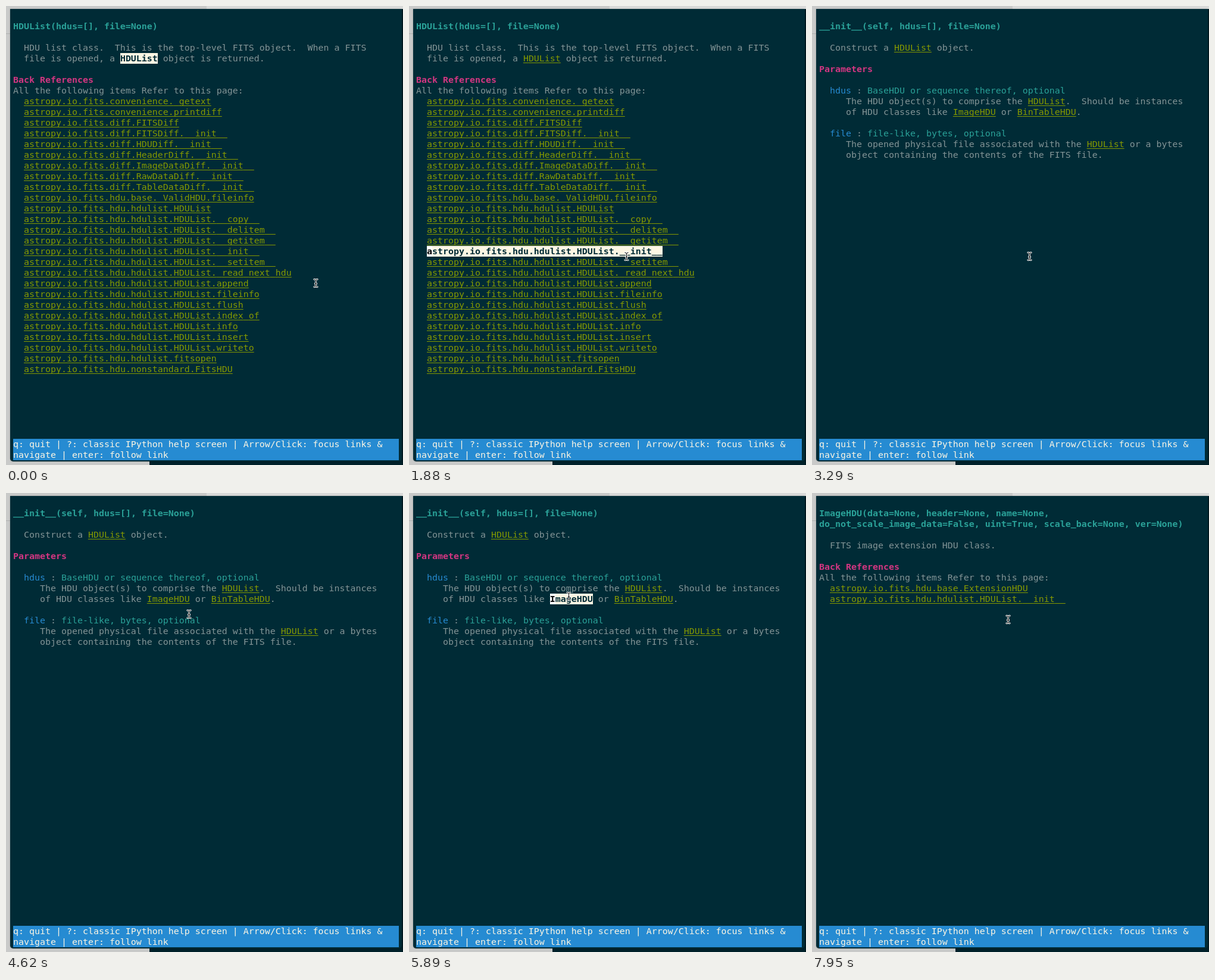
Animation of 667 by 771 pixels, one loop 8 s. Source, as an HTML page:

```html
<!DOCTYPE html>
<html lang="en">
<head>
<meta charset="utf-8">
<title>Terminal help browser</title>
<style>
  html, body { margin: 0; width: 100%; height: 100%; overflow: hidden; }
  body { position: relative; background: #c9cac9; }
  body > * { position: absolute; }
  .top { left: 337px; top: 0; right: 0; height: 6px; background: #d9dad9; }
  .edge { left: 0; top: 46px; width: 7px; height: 1px; background: #b0b1b0; }
  .below { left: 241px; top: 760px; right: 0; bottom: 0; background: #00212a; }
  .side { left: 665px; top: 5px; width: 2px; bottom: 0; background: #001a21; }
  .window {
    left: 7px; top: 5px; width: 658px; height: 760px;
    background: #002b36; border-radius: 0 0 5px 5px;
    box-shadow: 0 0 2px rgba(0, 0, 0, .4);
  }
  pre {
    left: 12px; top: 25px; margin: 0; color: #839496;
    font: 14.95px/18px "DejaVu Sans Mono", monospace;
    font-variant-ligatures: none;
  }
  .bar { top: 727px; width: 648px; height: 36px; background: #268bd2; color: #fdf6e3; }
  h1, h2 { display: inline; font-size: inherit; margin: 0; }
  h1, em { color: #2aa198; }
  h2 { color: #d33682; }
  em, i { font-style: normal; }
  i { color: #268bd2; }
  a {
    display: inline-block; height: 18px; vertical-align: top; color: #859900;
    text-decoration: underline 1px; text-underline-offset: 2px;
    text-decoration-skip-ink: none;
  }
  a.on { background: #fdf6e3; color: #002b36; font-weight: bold; text-decoration: none; }
  s { text-decoration: none; }
  a.on.lit s { display: inline-block; background: #fff; color: #000; }
  u { position: relative; top: -1px; text-decoration: none; }
  svg { left: -8px; top: -10px; width: 16px; height: 20px; }
</style>
</head>
<body>
<div class="top"></div>
<div class="edge"></div>
<div class="below"></div>
<div class="side"></div>
<div class="window"></div>
<pre class="bar">q: quit | ?: classic IPython help screen | Arrow/Click: focus links &amp;
navigate | enter: follow link</pre>
<svg id="mouse" viewBox="-8 -10 16 20" fill="none" stroke-linecap="round">
  <g id="beam">
    <path id="shape" stroke="#fff" stroke-width="2.8"
      d="M-2.7-6.3Q0-6.3 0-4Q0-6.3 2.7-6.3M0-4V4M-2.7 6.3Q0 6.3 0 4Q0 6.3 2.7 6.3M-1.3 1H1.3"/>
    <path stroke="#000" stroke-width="1"
      d="M-2.7-6.3Q0-6.3 0-4Q0-6.3 2.7-6.3M0-4V4M-2.7 6.3Q0 6.3 0 4Q0 6.3 2.7 6.3M-1.3 1H1.3"/>
  </g>
</svg>
<script>
const LOOP = 8000;

// Underscores sit a little higher than the font draws them.
const raise = text => text.replace(/_+/g, '<u>$&</u>');
const link = (text, id = '') =>
  `<a${id && ` id="${id}"`}><s>${text[0]}</s>${raise(text.slice(1))}</a>`;
const head = text => `<h1>${raise(text)}</h1>`;
const list = (prefix, names) => names.split(' ').map(n =>
  '  ' + link(prefix + n, n === 'hdulist.HDUList.__init__' ? 'init' : '')).join('\n');
const refs = '<h2>Back References</h2>\nAll the following items Refer to this page:\n';

const methods = ('__copy__ __delitem__ __getitem__ __init__ __setitem__ _read_next_hdu ' +
  'append fileinfo flush index_of info insert writeto')
  .replace(/\S+/g, 'hdulist.HDUList.$&');

const pages = [
`${head('HDUList(hdus=[], file=None)')}

  HDU list class.  This is the top-level FITS object.  When a FITS
  file is opened, a ${link('HDUList', 'cls')} object is returned.

${refs}${list('astropy.io.fits.', 'convenience._getext convenience.printdiff diff.FITSDiff ' +
  'diff.FITSDiff.__init__ diff.HDUDiff.__init__ diff.HeaderDiff.__init__ ' +
  'diff.ImageDataDiff.__init__ diff.RawDataDiff.__init__ diff.TableDataDiff.__init__')}
${list('astropy.io.fits.hdu.', 'base._ValidHDU.fileinfo hdulist.HDUList ' + methods +
  ' hdulist.fitsopen nonstandard.FitsHDU')}`,

`${head('__init__(self, hdus=[], file=None)')}

  Construct a ${link('HDUList')} object.

<h2>Parameters</h2>

  <i>hdus</i> : <em>BaseHDU or sequence thereof, optional</em>
     The HDU object(s) to comprise the ${link('HDUList', 'arg')}.  Should be instances
     of HDU classes like ${link('ImageHDU', 'image')} or ${link('BinTableHDU')}.

  <i>file</i> : <em>file-like, bytes, optional</em>
     The opened physical file associated with the ${link('HDUList')} or a bytes
     object containing the contents of the FITS file.`,

`${head('ImageHDU(data=None, header=None, name=None,\ndo_not_scale_image_data=False, uint=True, scale_back=None, ver=None)')}

  FITS image extension HDU class.

${refs}  ${link('astropy.io.fits.hdu.base.ExtensionHDU')}
  ${link('astropy.io.fits.hdu.hdulist.HDUList.__init__')}`
].map(html => {
  const pre = document.createElement('pre');
  pre.innerHTML = html;
  document.body.insertBefore(pre, mouse);
  return pre;
});

// [start, page, focused link]
const scenes = [
  [0, 0, 'cls'], [1370, 0, 'init'], [3290, 1, ''],
  [5110, 1, 'arg'], [5890, 1, 'image'], [6570, 2, '']
];
// [start, block cursor shown]
const blinks = [[0, 0], [90, 1], [600, 0], [1110, 1], [2600, 0], [3110, 1]];
// [time, x, y]
const path = [
  [0, 520, 465], [540, 520, 465], [700, 496, 457], [900, 428, 431], [1080, 380, 413],
  [1250, 366, 409], [1740, 366, 409], [1880, 365, 420],
  [4120, 365, 420], [4220, 400, 412], [4310, 470, 380], [4380, 510, 335],
  [4450, 480, 285], [4530, 390, 240], [4620, 307, 203], [4760, 284, 183],
  [4930, 271, 174], [5020, 268, 173],
  [7090, 268, 173], [7200, 290, 198], [7340, 322, 228],
  [7450, 322, 228], [7630, 326, 221], [7740, 326, 221], [7950, 329, 212], [LOOP, 329, 212]
];

const at = (table, t) => table.findLast(row => row[0] <= t);

function pointer(t) {
  const i = path.findIndex(p => p[0] > t);
  const [t0, x0, y0] = path[i - 1], [t1, x1, y1] = path[i];
  const k = (t - t0) / (t1 - t0);
  return [x0 + (x1 - x0) * k, y0 + (y1 - y0) * k];
}

const links = document.querySelectorAll('a[id]');

function draw(now) {
  const t = now % LOOP;
  const [, page, focus] = at(scenes, t);
  const lit = !!at(blinks, t)[1];
  pages.forEach((p, i) => p.style.visibility = i === page ? 'visible' : 'hidden');
  links.forEach(a => {
    a.classList.toggle('on', a.id === focus);
    a.classList.toggle('lit', lit);
  });
  const [x, y] = pointer(t).map(Math.round);
  mouse.style.transform = `translate(${x + .5}px, ${y + .5}px)`;
}

const start = performance.now();
function tick() {
  draw(performance.now() - start);
  requestAnimationFrame(tick);
}
tick();
</script>
</body>
</html>
```
